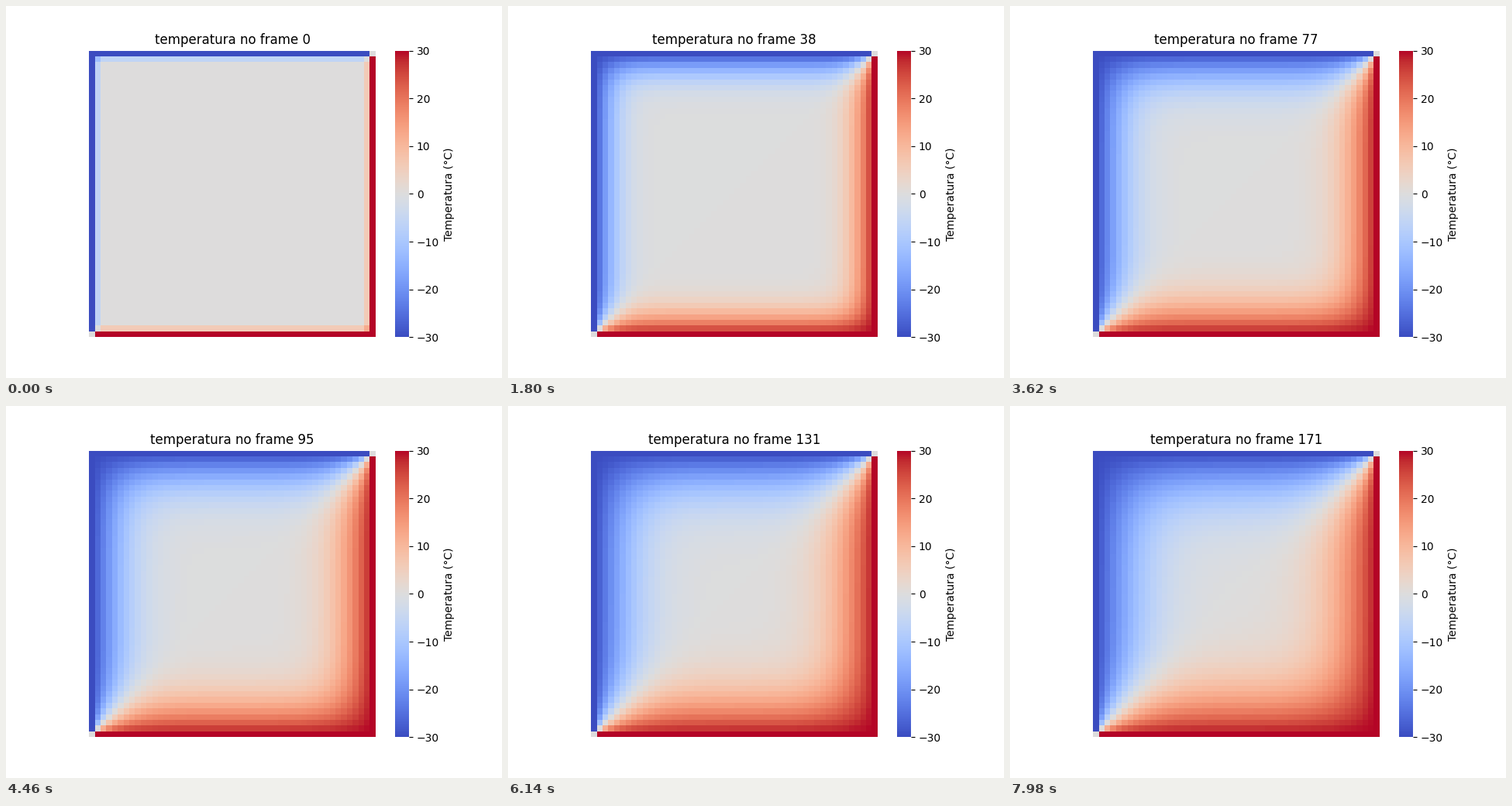
Animation, 640 px wide and 480 px high, one loop 8000 ms. Source, as a matplotlib script:

```python
import numpy as np
import matplotlib.pyplot as plt
from matplotlib.animation import FuncAnimation

SIZE = 50
HEAT = 30
ALPHA = 0.2
TICK = 20          # ms
TICKS = 400


def step_at(tick):
    """Three steps every seven ticks, the middle one held for five."""
    group, rest = divmod(tick, 7)
    return 3 * group + (rest > 0) + (rest > 5)


def simulate(count):
    u = np.zeros((SIZE, SIZE))
    u[0, :-1] = u[:-1, 0] = -HEAT
    u[-1, 1:] = u[1:, -1] = HEAT
    states = []
    for _ in range(count):
        mid = u[1:-1, 1:-1]
        around = u[:-2, 1:-1] + u[2:, 1:-1] + u[1:-1, :-2] + u[1:-1, 2:]
        new = u.copy()
        new[1:-1, 1:-1] = mid + ALPHA * (around - 4 * mid)
        u = new
        states.append(u)
    return states


states = simulate(step_at(TICKS - 1) + 1)

fig, ax = plt.subplots(figsize=(6.4, 4.8), dpi=100)
mesh = ax.pcolormesh(states[0], cmap="coolwarm", vmin=-HEAT, vmax=HEAT)
ax.set(xlim=(0, SIZE), ylim=(SIZE, 0), xticks=[], yticks=[], aspect="equal")
ax.spines[:].set_visible(False)
bar = fig.colorbar(mesh, ax=ax, label="Temperatura (°C)")
bar.outline.set_linewidth(0)
title = ax.set_title("")


def update(tick):
    step = step_at(tick)
    mesh.set_array(states[step])
    title.set_text(f"temperatura no frame {step}")
    return mesh, title


anim = FuncAnimation(fig, update, frames=TICKS, interval=TICK,
                     init_func=lambda: update(0), repeat=True, repeat_delay=0)
plt.show()
```
